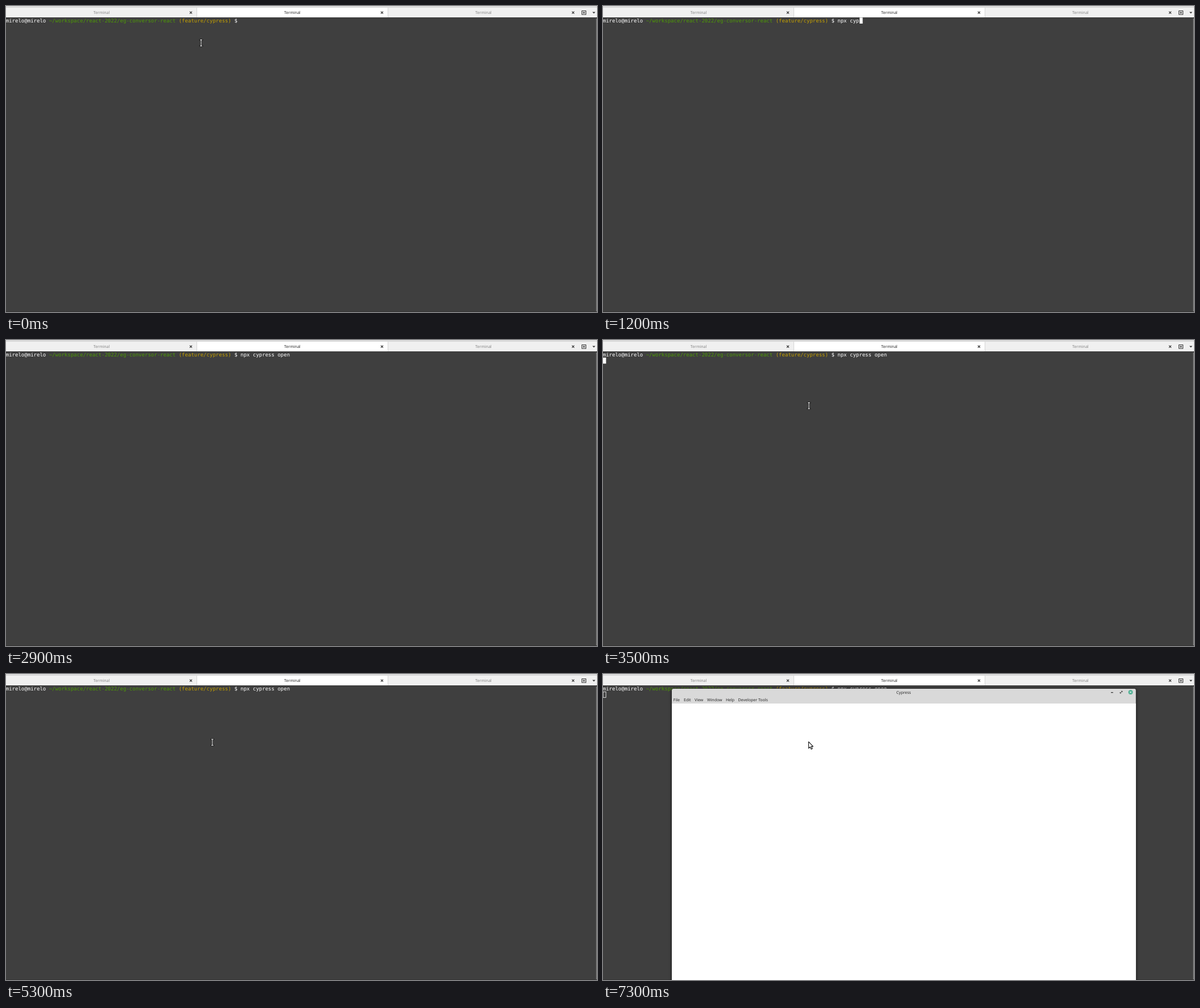
Animation of 1039 by 539 pixels, one loop 8000 ms. Source, as an HTML page:

```html
<!DOCTYPE html>
<html lang="en">
<head>
<meta charset="utf-8">
<title>Terminal</title>
<style>
  html, body { margin: 0; width: 100%; height: 100%; overflow: hidden; background: #3f3f3f; }
  svg { display: block; }
  text { text-rendering: geometricPrecision; white-space: pre; }
  .mono { font: 9.027px "DejaVu Sans Mono", monospace; fill: #fff; }
  .ui { font: 7px "Noto Sans", sans-serif; fill: #2b2b2b; }
  .mid { text-anchor: middle; }
  .dim { fill: #858585; }
  .path { fill: #4e9a06; }
  .branch { fill: #c4a000; }
  .line { fill: none; stroke: #333; }
</style>
</head>
<body>
<svg width="1039" height="539" viewBox="0 0 1039 539">
  <defs>
    <path id="cross" d="M-2-2 2 2M2-2-2 2"/>
    <filter id="blur" x="-10%" y="-10%" width="120%" height="120%"><feGaussianBlur stdDeviation="2.5"/></filter>
  </defs>

  <rect width="1039" height="539" fill="#3f3f3f"/>
  <rect x="1037.6" y="22" width="1.4" height="517" fill="#8a8a8a"/>
  <rect y="538" width="1039" height="1" fill="#343434"/>

  <g id="tabs">
    <rect width="1039" height="20" fill="#f0f0f0"/>
    <rect x="336" y="2" width="335.5" height="18" fill="#fff"/>
    <rect width="1039" height="2" fill="#dcdcdc"/>
    <path d="M0 2.5H1039M335.5 3V20M671.5 3V20" class="line" style="stroke:#d6d6d6"/>
    <text class="ui mid dim" x="168" y="14.3">Terminal</text>
    <text class="ui mid" x="503.3" y="14.3">Terminal</text>
    <text class="ui mid dim" x="839.3" y="14.3">Terminal</text>
    <g class="line" stroke-width="1.3">
      <use href="#cross" x="325" y="11.6"/>
      <use href="#cross" x="661" y="11.6"/>
      <use href="#cross" x="997" y="11.6"/>
    </g>
    <path d="M1012.5 8.5H1019.5V15H1012.5ZM1016 9.7V13.7M1014 11.7H1018" class="line" stroke-width="1.1"/>
    <path d="M1030.8 10.4H1036.2L1033.5 13.2Z" fill="#333"/>
  </g>

  <text class="mono" x="-0.3" y="28.8">mirelo@mirelo <tspan class="path">~/workspace/react-2022/eg-conversor-react</tspan> <tspan class="branch">(feature/cypress)</tspan> $ <tspan id="typed"></tspan></text>
  <rect id="caret" width="5.4" height="10.6" fill="#fff"/>
  <rect id="hollow" x="0.2" y="31.3" width="4.9" height="10" fill="none" stroke="#fff" stroke-width="0.8"/>

  <g id="beam">
    <path d="M-2-5.3H2M0-5.3V5.3M-2 5.3H2" fill="none" stroke="#151515" stroke-width="2.4" stroke-linecap="square"/>
    <path d="M-2-5.3H2M0-5.3V5.3M-2 5.3H2" fill="none" stroke="#fff" stroke-width="1"/>
  </g>

  <g id="app">
    <rect x="120" y="26.5" width="818" height="530" rx="3" fill="#000" opacity=".5" filter="url(#blur)"/>
    <path d="M120.5 540V29Q120.5 25.5 124 25.5H934Q937.3 25.5 937.3 29V540Z" fill="#2f2f2f"/>
    <path d="M121 540V29Q121 26 124 26H934Q936.8 26 936.8 29V540Z" fill="#d9d9d9"/>
    <rect x="121" y="52" width="815.8" height="487" fill="#fff"/>
    <text class="ui mid" x="528.5" y="35.3" font-weight="500" style="font-weight:500">Cypress</text>
    <g id="menu"></g>
    <path d="M893 32.6H896.8" class="line" stroke-width="1.3"/>
    <path d="M911.3 30.2H913V31.9ZM909 32.2V33.9H910.7Z" class="line" fill="#333" stroke-width=".8"/>
    <path d="M909.6 33.4 912.4 30.7" class="line" stroke-width=".7"/>
    <circle cx="927.5" cy="32.1" r="3.9" fill="#4bae90"/>
    <use href="#cross" transform="translate(927.5 32.1) scale(.75)" stroke="#fff" stroke-width="1.3"/>
    <path d="M361.5 119.3V130.9L364.2 128.4 366.1 132.5 368.1 131.6 366.2 127.6H369.4Z"
      fill="#fff" stroke="#111" stroke-width="1.1" stroke-linejoin="round"/>
  </g>
</svg>
<script>
  const LOOP = 8000, CELL = 5.435, PROMPT = 76, COMMAND = 'npx cypress open';
  const el = id => document.getElementById(id);

  // Each table holds [start time, value]; a value lasts until the next entry.
  const TYPED = [[0, 0], [500, 1], [600, 2], [700, 3], [800, 4], [900, 5], [1000, 6],
    [1200, 7], [1300, 9], [1400, 10], [1600, 11], [1700, 12], [1900, 13], [2000, 15], [2100, 16]];
  const CARET = [[0, 0], [100, 1], [2900, 0], [3500, 1], [4300, 0], [4800, 1],
    [5300, 0], [6000, 1], [6500, 0], [7300, 0]];
  const BEAM = [[0, [343, 65]], [400, null], [3500, [362, 115.7]], [3800, [362.8, 120.3]], [7300, null]];
  const ENTER = 2300, OPEN = 7300;

  const MENU = { File: 123.8, Edit: 142, View: 161, Window: 183, Help: 215.9, 'Developer Tools': 237.5 };
  el('menu').innerHTML = Object.entries(MENU)
    .map(([name, x]) => `<text class="ui" x="${x}" y="47.8">${name}</text>`).join('');

  const at = (table, t) => table.findLast(([start]) => start <= t)[1];
  const show = (id, on) => el(id).setAttribute('visibility', on ? 'visible' : 'hidden');

  function draw(t) {
    const count = at(TYPED, t), beam = at(BEAM, t), entered = t >= ENTER;
    el('typed').textContent = COMMAND.slice(0, count);
    el('caret').setAttribute('x', entered ? 0 : (PROMPT + count) * CELL);
    el('caret').setAttribute('y', entered ? 31 : 20.4);
    show('caret', at(CARET, t));
    show('beam', beam);
    if (beam) el('beam').setAttribute('transform', `translate(${beam})`);
    show('hollow', t >= OPEN);
    show('app', t >= OPEN);
  }

  const begin = performance.now();
  function tick() {
    draw((performance.now() - begin) % LOOP);
    requestAnimationFrame(tick);
  }
  tick();
</script>
</body>
</html>
```
